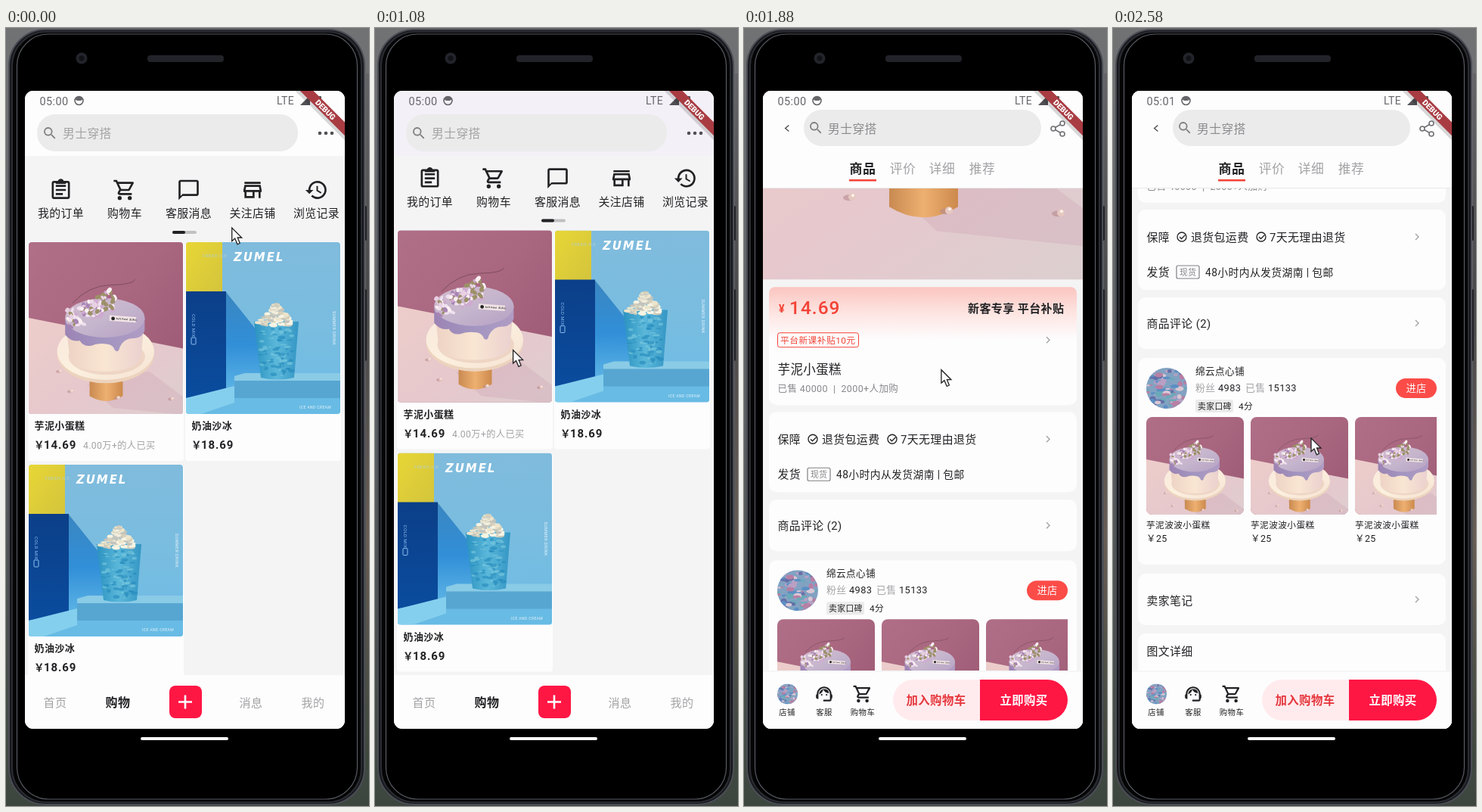
Recreate the animation shown at these times as an HTML page. Size 480 by 1028 pixels, loop 2620 ms.

```html
<!DOCTYPE html>
<html lang="zh-CN">
<head>
<meta charset="utf-8">
<title>Shop app</title>
<style>
html, body { margin: 0; width: 100%; height: 100%; overflow: hidden; background: #000; }
svg { display: block; width: 100%; height: 100%; }
text { font-family: Roboto, "Noto Sans CJK SC", "Noto Sans CJK", sans-serif; letter-spacing: .4px; white-space: pre; }
.b { font-weight: 700; }
.m { text-anchor: middle; }
</style>
</head>
<body>
<svg id="stage" viewBox="0 0 480 1028"></svg>
<script>
const PAGE = '#f4f4f5', WHITE = '#fdfdfe', FIELD = '#ebebeb', INK = '#222224', GRAY = '#a3a3a5', MID = '#808083';
const RED = '#f34336', HOT = '#ff1744';
const LOOP = 2620;

let seed = 7, clips = 0;
const rnd = (a = 0, b = 1) => {
  seed = (seed * 16807) % 2147483647;
  return a + (b - a) * seed / 2147483647;
};
const many = (n, f) => Array.from({ length: n }, (_, i) => f(i)).join('');
const text = (x, y, size, s, fill = INK, cls = '', more = '') =>
  `<text x="${x}" y="${y}" font-size="${size}" fill="${fill}" class="${cls}" ${more}>${s}</text>`;
const rect = (x, y, w, h, fill, r = 0, more = '') =>
  `<rect x="${x}" y="${y}" width="${w}" height="${h}" rx="${r}" fill="${fill}" ${more}/>`;
const oval = (x, y, rx, ry, fill, more = '') =>
  `<ellipse cx="${x}" cy="${y}" rx="${rx}" ry="${ry}" fill="${fill}" ${more}/>`;
const dot = (x, y, r, fill, more) => oval(x, y, r, r, fill, more);
const path = (d, fill, more = '') => `<path d="${d}" fill="${fill}" ${more}/>`;
const line = (d, color, w = 1.5, more = '') => path(d, 'none', `stroke="${color}" stroke-width="${w}" ${more}`);
const group = (s, more = '') => `<g ${more}>${s}</g>`;
const clip = (x, y, w, h, r, s) => {
  const id = 'clip' + clips++;
  return `<clipPath id="${id}">${rect(x, y, w, h, '#000', r)}</clipPath>` + group(s, `clip-path="url(#${id})"`);
};
const fade = (id, dir, ...stops) =>
  `<linearGradient id="${id}" ${dir}>` +
  stops.map((c, i) => `<stop offset="${i / (stops.length - 1)}" stop-color="${c}"/>`).join('') + '</linearGradient>';
const DOWN = 'x2="0" y2="1"', DIAG = 'x2="1" y2="1"', ACROSS = 'x2="1"';

const icons = {
  order: 'M7 15h7v2H7zm0-4h10v2H7zm0-4h10v2H7zm12-4h-4.18C14.4 1.84 13.3 1 12 1s-2.4.84-2.82 2H5c-1.1 0-2 .9-2 2v14c0 1.1.9 2 2 2h14c1.1 0 2-.9 2-2V5c0-1.1-.9-2-2-2zm0 16H5V5h2v1h10V5h2z',
  cart: 'M15.55 13c.75 0 1.41-.41 1.75-1.03l3.58-6.49A1 1 0 0 0 20 4H5.21l-.94-2H1v2h2l3.6 7.59-1.35 2.44C4.52 15.37 5.48 17 7 17h12v-2H7l1.1-2zM6.16 6h12.15l-2.76 5H8.53zM7 18a2 2 0 1 0 0 4 2 2 0 0 0 0-4zm10 0a2 2 0 1 0 0 4 2 2 0 0 0 0-4z',
  chat: 'M20 2H4c-1.1 0-2 .9-2 2v18l4-4h14c1.1 0 2-.9 2-2V4c0-1.1-.9-2-2-2zm0 14H6l-2 2V4h16z',
  store: 'M18.36 9l.6 3H5.04l.6-3zM20 4H4v2h16zm0 3H4l-1 5v2h1v6h10v-6h4v6h2v-6h1v-2zM6 18v-4h6v4z',
  history: 'M13 3a9 9 0 0 0-9 9H1l4 4 4-4H6a7 7 0 1 1 2.06 4.94l-1.42 1.42A9 9 0 1 0 13 3zm-1 5v5l4.28 2.54.72-1.21-3.5-2.08V8z',
  search: 'M15.5 14h-.79l-.28-.27a6.5 6.5 0 1 0-.7.7l.27.28v.79l5 5 1.5-1.5zm-6 0a4.5 4.5 0 1 1 0-9 4.5 4.5 0 0 1 0 9z',
  agent: 'M21 12.2C21 6.7 16.7 3 12 3s-9 3.7-9 9.3c-.6.3-1 1-1 1.7v2c0 1.1.9 2 2 2h1v-6.1a7 7 0 0 1 14 0V19h-8v2h8c1.1 0 2-.9 2-2v-1.2c.6-.3 1-.9 1-1.6v-2.3c0-.8-.4-1.4-1-1.7zM8 13a1 1 0 1 0 2 0 1 1 0 0 0-2 0zm6 0a1 1 0 1 0 2 0 1 1 0 0 0-2 0zm4-2A6 6 0 0 0 12 6c-3 0-6.3 2.5-6 6.4a8 8 0 0 0 4.9-5.9A8 8 0 0 0 18 11z'
};
const icon = (name, x, y, size, fill = INK) =>
  path(icons[name], fill, `fill-rule="evenodd" transform="translate(${x - size / 2} ${y - size / 2}) scale(${size / 24})"`);
const chevron = (x, y, s = 1, color = GRAY) => line(`M${x - 2 * s} ${y - 4}l${4 * s} 4l${-4 * s} 4`, color, 1.4);
const tick = x => dot(x, 666, 6, 'none', `stroke="${INK}" stroke-width="1.3"`) + line(`M${x - 3} 666l2.5 2.5l5-5`, INK, 1.3);

const flowers = () => many(90, () => {
  const k = rnd(), x = 112 + k * 122 + rnd(-14, 14), y = 258 - k * 58 + rnd(-27, 27);
  const c = ['#efe0ee', '#fbf0f2', '#cfaad0', '#e8cfe2', '#9c9068', '#a884b4'][Math.floor(rnd(0, 6))];
  return oval(x, y, rnd(4, 10), rnd(3, 6), c, `transform="rotate(${rnd(0, 180)} ${x} ${y})"`);
});
const cake = group(
  rect(0, 0, 423, 564, 'url(#wall)') +
  path('M0 254L423 338V564H0Z', 'url(#table)') +
  path('M160 436L330 400L423 470V520L230 500Z', '#cba0ae', 'opacity=".3"') +
  path('M167 420V468Q212 496 258 468V420Z', 'url(#gold)') +
  oval(211, 354, 133, 79, '#ecd3bd') + oval(211, 346, 133, 78, 'url(#plate)') +
  oval(214, 360, 105, 50, '#e8c8b8', 'opacity=".6"') +
  path('M101 254L112 362Q125 400 211 401Q295 400 308 362L318 254Z', 'url(#body)') +
  path('M100 254V300Q118 322 140 316Q150 334 172 330Q190 322 215 326Q232 328 236 342Q246 352 250 334Q262 308 290 310Q312 308 318 288V254Z', 'url(#drip)') +
  oval(209, 254, 109, 54, 'url(#icing)') +
  line('M120 214Q165 165 225 164T292 149', '#6b4450', 1.5) + flowers() +
  group(rect(0, 0, 73, 15, '#f2e4e6') + dot(10, 8, 5, '#222') + text(18, 10, 6.5, 'Soft Petal  云点心', '#333', 'b'), 'transform="translate(222 247) rotate(4)"') +
  [[87, 400], [118, 455], [246, 473], [394, 476]].map(([x, y]) =>
    oval(x - 4, y + 1, 8, 4, '#b88a90', 'opacity=".6"') + dot(x, y, 5, '#e6c8c0') + dot(x + 1, y - 2, 2, '#fff4ea')).join(''),
  'id="cake"');

const drink = group(
  rect(0, 0, 204, 227, 'url(#sky)') + rect(0, 0, 48, 68, 'url(#lemon)') +
  path('M0 188H204V227H0Z', '#68bbe4') + path('M53 66L98 122V180L40 205Z', 'url(#blue)') +
  path('M0 65H53V196L0 206Z', 'url(#navy)') + path('M0 206L64 190V212L20 227H0Z', '#85cfee') +
  path('M64 177L78 173H204V184H64Z', '#8acbe6') + path('M64 183H204V206H64Z', '#57a6d2') +
  path('M90 105H149L143 179Q121 184 99 179Z', 'url(#cup)') +
  many(70, () => oval(rnd(98, 141), rnd(114, 177), rnd(1.5, 5), rnd(.8, 2.5), rnd() < .5 ? '#7ecbe0' : '#2389bb', 'opacity=".6"')) +
  many(90, i => {
    const k = i / 90, w = 27 * (1 - k);
    return oval(119 + rnd(-w, w), 110 - k * 28, rnd(2.5, 5.5), rnd(1.5, 3), ['#ece5cc', '#d5d0bc', '#f8f4e4', '#c2c4bc'][i % 4]);
  }) +
  text(63, 25, 15, 'ZUMEL', '#fff', 'b', 'font-style="italic" style="font-family:\'DejaVu Sans\',sans-serif;letter-spacing:1.9px"') +
  text(22, 20, 6, 'FRESH ICE', '#b5cfca') +
  text(0, 0, 6, 'COLD MIX', '#8fbdf0', '', 'transform="translate(8 95) rotate(90)"') +
  rect(7, 126, 6, 9, 'none', 1, 'stroke="#8fbdf0"') +
  text(0, 0, 5.5, 'SUMMER DRINK', '#e8f4fc', '', 'transform="translate(194 91) rotate(90)"') +
  text(150, 220, 5, 'ICE AND CREAM', '#e8f4fc'),
  'id="drink"');

const avatar = group(clip(-27, -27, 54, 54, 27,
  rect(-27, -27, 54, 54, '#82a2c2') + many(90, () => oval(rnd(-27, 27), rnd(-27, 27), rnd(2, 6), rnd(1, 4),
    ['#5b8fc4', '#b9a0c4', '#d9c6d4', '#6aa9b8', '#6470a8', '#b87fa4'][Math.floor(rnd(0, 6))]))), 'id="avatar"');

const picture = (id, x, y, w, h, r) => {
  const [vw, vh] = id === 'cake' ? [423, 564] : [204, 227], s = w / vw;
  return clip(x, y, w, h, r, `<use href="#${id}" transform="translate(${x} ${y + (h - vh * s) / 2}) scale(${s})"/>`);
};

const product = (id, x, y, name, price, note = '') =>
  rect(x - 1, y, 206, 289, WHITE, 4) + picture(id, x, y, 204, 227, 4) +
  text(x + 7.5, y + 247, 13, name, INK, 'b') + text(x + 7, y + 273, 13.5, '￥', INK, 'b') +
  text(x + 20, y + 273, 15, price, INK, 'b', 'style="letter-spacing:.9px"') + text(x + 72, y + 273, 12.2, note, GRAY);

const shortcuts = [['order', '我的订单'], ['cart', '购物车'], ['chat', '客服消息'], ['store', '关注店铺'], ['history', '浏览记录']];
const home = rect(25, 83, 423, 843, PAGE) +
  clip(25, 169, 423, 686, 0, group(
    shortcuts.map(([name, label], i) => icon(name, 72.5 + i * 84.5, 214, 32) + text(72.5 + i * 84.5, 250, 14.9, label, INK, 'm')).join('') +
    rect(220, 268, 32, 4, '#c0c0c2', 2) + rect(220, 268, 17, 4, INK, 2) +
    product('cake', 30, 283, '芋泥小蛋糕', '14.69', '4.00万+的人已买') +
    product('drink', 238, 283, '奶油沙冰', '18.69') + product('drink', 30, 577, '奶油沙冰', '18.69'), 'id="list"')) +
  rect(25, 83, 423, 86, WHITE, 0, 'id="bar"') + rect(41, 114, 345, 49, FIELD, 24) +
  icon('search', 58, 139, 21, MID) + text(75, 145, 15.8, '男士穿搭', GRAY) +
  [415, 423, 431].map(x => dot(x, 139, 2.3, '#505054')).join('') +
  rect(25, 855, 423, 71, WHITE) +
  [[65, '首页'], [324, '消息'], [406, '我的']].map(([x, s]) => text(x, 897, 15, s, GRAY, 'm')).join('') +
  text(148, 897, 16, '购物', INK, 'b m') + rect(216, 869, 43, 43, HOT, 8) + line('M228 890.5h18m-9-9v18', WHITE, 2.6);

const card = (y, h) => rect(33, y, 407, h, WHITE, 10);
const thumb = x => picture('cake', x, 904, 129, 129, 8) +
  text(x, 1051, 11.7, '芋泥波波小蛋糕') + text(x, 1069, 12.5, '￥25');
const content = picture('cake', 25, -109, 423, 564, 0) +
  card(465, 156) + rect(33, 465, 407, 70, 'url(#sale)', 8) +
  text(46, 499, 14, '¥', RED, 'b') + text(60, 501, 24.5, '14.69', RED, '', 'font-weight="500" style="letter-spacing:1px"') +
  text(296, 499, 15, '新客专享 平台补贴', INK, 'b') +
  rect(44.5, 525.5, 107, 19, 'none', 3, `stroke="${RED}"`) + text(48, 540, 11.8, '平台新课补贴10元', RED) + chevron(402, 535) +
  text(44.5, 580, 16.5, '芋泥小蛋糕') + text(44.5, 604, 12.5, '已售 40000  |  2000+人加购', '#88888c') +
  card(630, 106) + text(44.5, 672, 14.9, '保障') + tick(91) + text(103, 672, 14.9, '退货包运费') + tick(196) +
  text(207, 672, 14.9, '7天无理由退货') + chevron(402, 666) + text(44.5, 718, 14.9, '发货') +
  rect(84, 704, 30, 17, 'none', 2, `stroke="${MID}" stroke-width="1.2"`) + text(88, 717, 10.8, '现货', MID) +
  text(122, 718, 13.8, '48小时内从发货湖南 | 包邮') +
  card(746, 68) + text(44.5, 786, 14.9, '商品评论 (2)') + chevron(402, 780) +
  card(826, 273) + '<use href="#avatar" x="71" y="866"/>' + text(109, 848, 12.6, '绵云点心铺') +
  text(109, 870, 12.8, '粉丝', GRAY) + text(139, 870, 12.8, '4983') + text(175, 870, 12.8, '已售', GRAY) + text(205, 870, 12.8, '15133') +
  rect(109, 881, 50, 17, FIELD, 2) + text(112, 894, 10.8, '卖家口碑') + text(166, 894, 11.8, '4分') +
  rect(374, 853, 54, 26, '#fb4c48', 13) + text(401, 871, 13.2, '进店', WHITE, 'm') +
  clip(44, 900, 384, 180, 0, [44, 182, 320].map(thumb).join('')) +
  card(1111, 68) + text(44.5, 1152, 14.9, '卖家笔记') + chevron(402, 1145) +
  card(1190, 90) + text(44.5, 1219, 14.9, '图文详细');

const share = line('M421 126L409 133L421 140', '#707074') +
  [[409, 133], [421, 126], [421, 140]].map(([x, y]) => dot(x, y, 3, WHITE, 'stroke="#707074" stroke-width="1.6"')).join('');
const star = 'M361 122l2.9 6 6.5.8-4.8 4.5 1.3 6.5-5.9-3.2-5.9 3.2 1.3-6.5-4.8-4.5 6.5-.8z';
const detail = rect(25, 83, 423, 843, PAGE) + clip(25, 83, 423, 767, 0, group(content, 'id="content"')) +
  group(rect(25, 83, 423, 128, WHITE) + line('M25 211.5H448', '#e9e9ea', 1) + rect(79, 108, 314, 48, FIELD, 24) +
    chevron(57, 132.5, -1.2, '#505054') + share +
    [[210, '评价'], [262, '详细'], [315, '推荐']].map(([x, s]) => text(x, 192, 16.8, s, GRAY, 'm')).join(''), 'id="top"') +
  rect(78, 108, 315, 48, '#c3d0c8', 24, 'id="tint"') +
  group([56, 307, 361, 415].map(x => dot(x, 131, 21, '#96667a', 'opacity=".5"')).join('') + chevron(56, 131, -1.2, WHITE) +
    icon('search', 307, 131, 22, WHITE) + line(star, WHITE) + line('M411 129l4 4 4-4', WHITE), 'id="round"') +
  icon('search', 95, 132, 21, MID) + text(111, 139, 15.8, '男士穿搭', '#8c8c90') +
  group(text(157, 192, 17, '商品', INK, 'b m') + rect(139, 200, 36, 2.5, RED), 'id="tab"') +
  rect(25, 849, 423, 77, WHITE) + line('M25 850H448', '#efeff0', 1) +
  '<use href="#avatar" transform="translate(57.5 880) scale(.5)"/>' + icon('agent', 106, 880, 26) + icon('cart', 157, 880, 27) +
  [[57, '店铺'], [106, '客服'], [157, '购物车']].map(([x, s]) => text(x, 908, 10.4, s, INK, 'm')).join('') +
  clip(197, 861, 231, 54, 27, rect(197, 861, 115, 54, '#ffebee') + rect(312, 861, 116, 54, HOT)) +
  text(254, 894, 15.4, '加入购物车', '#e5373c', 'b m') + text(370, 894, 15.4, '立即购买', WHITE, 'b m');

const STATUS = '#67676b';
const status = text(44.5, 101.5, 14.5, '05:00', STATUS, '', 'id="clock"') +
  dot(96.5, 96, 5.5, 'none', `stroke="${STATUS}" stroke-width="1.6"`) + path('M91 94a6 6 0 0 1 11 0l-3 2h-5z', STATUS) +
  text(358, 101, 14, 'LTE', STATUS) + path('M402 89V102H389Z', '#505054') + rect(409, 90, 8, 13, '#505054', 1) +
  group(rect(-50, 30, 100, 16, '#000', 0, 'opacity=".15"') + rect(-50, 29, 100, 12.5, '#a83c42') +
    text(0, 39, 10.3, 'DEBUG', WHITE, 'm', 'font-weight="900" style="letter-spacing:0"'), 'transform="translate(447.5 83) rotate(45)"');

const body = (x, y, w, h, r, fill, stroke, sw = 1.5) => rect(x, y, w, h, fill, r, `stroke="${stroke}" stroke-width="${sw}"`);
const phone = rect(0, 0, 480, 1028, 'url(#room)') + rect(476, 60, 4, 920, 'url(#edge)') +
  rect(472, 235, 5, 46, '#222328', 2) + rect(472, 345, 5, 95, '#222328', 2) +
  body(4, 2, 470, 1024, 48, '#17181c', '#4b4d55', 2) + body(8, 5, 462, 1018, 45, '#050506', '#2a2c33', 2) +
  body(14.5, 8, 450, 1011, 42, '#000', '#585b63', 1.2) +
  dot(100, 40, 7.5, '#22242b') + dot(100, 40, 3.5, '#111217') + rect(187, 36, 101, 9, '#222329', 4);

document.getElementById('stage').innerHTML = '<defs>' +
  fade('wall', DIAG, '#b07088', '#a9667f', '#985672') + fade('table', DIAG, '#edcdca', '#e6c8cd', '#dccfd0') +
  fade('gold', ACROSS, '#c98a52', '#eeb070', '#cc8a4c') + fade('plate', DIAG, '#f8e8dc', '#fcf0df', '#f5e2d2') +
  fade('body', ACROSS, '#edd2c4', '#f9e6d2', '#ead0cf') + fade('drip', ACROSS, '#9c84b4', '#a295c0', '#b09cc4') +
  fade('icing', DIAG, '#d3b9cc', '#c6b6cd', '#b5a0c4') + fade('sky', DOWN, '#80bbdc', '#79bde0', '#6dbbe6') +
  fade('lemon', DIAG, '#e8d636', '#d3c43c') + fade('blue', DOWN, '#3a86c0', '#318fd8', '#62b8e6') +
  fade('navy', DOWN, '#0c3f88', '#0a4c9e') + fade('cup', ACROSS, '#2a92c0', '#5cb8da', '#3496c4') +
  fade('sale', DOWN, '#fbc5c0', '#fde5e2', WHITE) + fade('edge', DOWN, '#646468', '#48484a', '#685c54', '#3c463c') +
  fade('room', DOWN, '#707274', '#5c5f63', '#3c463e') +
  cake + drink + avatar + '</defs>' + phone +
  clip(25, 83, 423, 843, 11, group(home) + group(detail, 'id="detail"') + status + rect(25, 915, 423, 11, 'none')) +
  rect(178, 937, 116, 4, '#f8f8f8', 2) +
  path('M0 0V17.5L4 14L7.3 21.8L10.5 20.3L7.5 13H13Z', WHITE, 'id="cursor" stroke="#222" stroke-width="1.3"');

// Each row: time, then the values reached at that time.
const pointer = [[0, 299, 263], [300, 215, 560], [540, 180, 643], [600, 180, 640], [830, 182, 426], [1080, 182, 424],
  [1230, 270, 655], [1330, 273, 593], [1710, 256, 483], [1850, 258, 400], [2000, 272, 650], [2080, 272, 621],
  [2290, 265, 450], [2450, 262, 542], [LOOP, 262, 542]];
const listMove = [[0, 0, 1], [600, 0, 1], [680, 15.4, 1], [830, 15.4, 1.0175], [880, 15.4, 1.0175], [980, 15.4, 1], [LOOP, 15.4, 1]];
const detailMove = [[0, 0], [1230, 0], [1330, 69], [1710, 193], [1850, 300], [1980, 366], [2080, 366], [2290, 535], [2420, 583], [LOOP, 583]];
const at = (keys, t) => {
  const i = keys.findIndex(k => k[0] > t), a = keys[i - 1], b = keys[i];
  const p = (t - a[0]) / (b[0] - a[0]);
  return a.slice(1).map((v, j) => v + (b[j + 1] - v) * p);
};
const $ = id => document.getElementById(id);
const set = (id, name, value) => $(id).setAttribute(name, value);

const start = performance.now();
function draw(now) {
  const t = Math.max(0, now - start) % LOOP;
  const [x, y] = at(pointer, t), [scroll, stretch] = at(listMove, t), [offset] = at(detailMove, t);
  set('cursor', 'transform', `translate(${x} ${y})`);
  set('list', 'transform', `translate(0 ${855 - (855 + scroll) * stretch}) scale(1 ${stretch})`);
  set('bar', 'fill', scroll > 0 ? '#f3f0f7' : WHITE);

  const open = Math.min(1, Math.max(0, (t - 1090) / 100)), solid = Math.min(1, offset / 145);
  set('detail', 'opacity', open);
  set('detail', 'transform', `translate(0 ${40 * (1 - open) ** 2})`);
  set('content', 'transform', `translate(0 ${193 - offset})`);
  set('top', 'opacity', solid);
  set('tab', 'opacity', Math.min(1, solid * 1.5));
  set('tint', 'opacity', .75 * (1 - solid));
  set('round', 'opacity', 1 - solid);
  $('clock').textContent = t < 2330 ? '05:00' : '05:01';
  requestAnimationFrame(draw);
}
draw(start);
</script>
</body>
</html>
```
